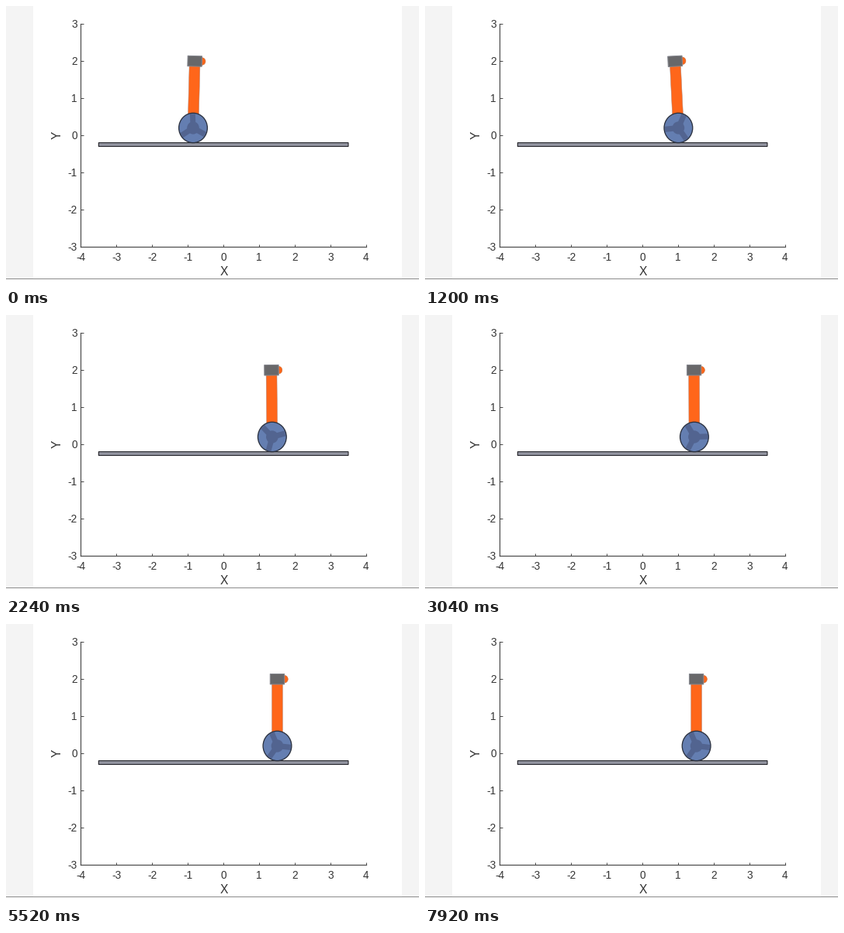
A matplotlib script that plays this animation: 532x363 px, repeating every 8000 ms.

```python
import numpy as np
import matplotlib.pyplot as plt
from matplotlib.animation import FuncAnimation
from matplotlib.patches import Circle, Polygon, Rectangle

W, H, DPI = 532, 363, 100
STEP, FRAMES = 80, 100
PX = 72 / DPI
INK, AXIS = "#333333", "#4a4a4a"
ORANGE, GREY = "#ff661a", "#68686a"
BLUE, DARK_BLUE = "#647eb1", "#526490"
R, ARM, GOAL = 0.4, 1.8, 1.512

# Frames in which the picture stands still
HOLDS = {11, 12, 16, 18, 19, 20, 25, 35, 40, 44, 49}

# Modes of the balancing controller: the gap to the goal is Re(sum c*exp(s*t))
COEF = np.array([2.05, 0.314 - 0.40j])
RATE = np.array([-1.17, -2.5 + 2j])

plt.rcParams["font.family"] = "Liberation Sans"
fig = plt.figure(figsize=(W / DPI, H / DPI), dpi=DPI, facecolor="white")

# Page behind the plot, in pixels from the top left
page = fig.add_axes([0, 0, 1, 1])
page.set(xlim=(0, W), ylim=(H, 0))
page.axis("off")
for x, w in ((0, 35), (510, 22)):
    page.add_patch(Rectangle((x, 0), w, 352, color="#f4f4f4", lw=0))
page.add_patch(Rectangle((0, 352), W, 1, color="#8c8c8c", lw=0))

LEFT, RIGHT, TOP, BOTTOM = 96.4, 463.9, 23.3, 310.8
ax = fig.add_axes([LEFT / W, 1 - BOTTOM / H, (RIGHT - LEFT) / W, (BOTTOM - TOP) / H])
ax.set(xlim=(-4, 4), ylim=(-3, 3), xticks=range(-4, 5), yticks=range(-3, 4))
ax.patch.set_visible(False)
ax.spines[["top", "right"]].set_visible(False)
for side in ("left", "bottom"):
    ax.spines[side].set(color=AXIS, linewidth=1.2 * PX)
ax.tick_params(direction="in", length=3.5 * PX, width=PX, color=AXIS,
               labelleft=False, labelbottom=False)


def label(x, y, s, size=13.6, **kw):
    page.text(x, y, s, fontsize=size * PX, color=INK, **kw)


for v in range(-4, 5):
    label(LEFT + (v + 4) * (RIGHT - LEFT) / 8, 328.6, str(v), ha="center")
for v in range(-3, 4):
    label(91.7, BOTTOM - (v + 3) * (BOTTOM - TOP) / 6 + 4.9, str(v), ha="right")
label(280.4, 347.6, "X", 15.6, ha="center")
label(66.2, 166.6, "Y", 15.6, ha="center", va="center", rotation=90)


def box(x0, x1, y0, y1):
    return np.array([(x0, y0), (x1, y0), (x1, y1), (x0, y1)])


def turn(pts, angle):
    c, s = np.cos(angle), np.sin(angle)
    return np.asarray(pts) @ np.array([[c, s], [-s, c]])


def add(patch, z):
    patch.set_zorder(z)
    return ax.add_patch(patch)


BODY = box(-0.15, 0.15, 0, ARM)
HEAD = box(-0.2, 0.2, ARM - 0.14, ARM + 0.14)
NOSE = np.array([0.2, ARM])
SPOKE = box(0, R - 0.02, -0.075, 0.075)

add(Rectangle((-3.5, -0.3), 7, 0.1, fc="#9496a2", ec="#2c2c32", lw=1.2 * PX,
              snap=False), 2)
body = add(Polygon(BODY, fc=ORANGE, ec="#b08070", lw=0.5 * PX), 3)
nose = add(Circle((0, 0), 0.1, fc=ORANGE, ec="#c0642c", lw=0.5 * PX), 3)
head = add(Polygon(HEAD, fc=GREY, ec="#85878f", lw=PX), 4)
wheel = add(Circle((0, 0), R, fc=BLUE, lw=0), 5)
spokes = [add(Polygon(SPOKE, fc=DARK_BLUE, lw=0), 6) for _ in range(3)]
hub = add(Circle((0, 0), 0.17, fc=DARK_BLUE, lw=0), 6)
rim = add(Circle((0, 0), R, fill=False, ec="#2a303e", lw=1.3 * PX), 7)
for part in (body, head, *spokes):
    part.set_snap(False)


def state(t):
    modes = COEF * np.exp(RATE * t)
    gap = modes.sum().real
    accel = -(modes * RATE**2).sum().real
    return GOAL - gap, 0.054 * accel


def draw(i):
    while i in HOLDS:
        i -= 1
    x, lean = state(i * STEP / 1000)
    axle = np.array([x, 0.2])
    body.set_xy(turn(BODY, -lean) + axle)
    head.set_xy(turn(HEAD, -lean) + axle)
    nose.center = turn(NOSE, -lean) + axle
    for part in (wheel, hub, rim):
        part.center = axle
    for k, spoke in enumerate(spokes):
        spoke.set_xy(turn(SPOKE, np.pi / 2 - x / R + k * 2 * np.pi / 3) + axle)
    return [body, head, nose, wheel, hub, rim, *spokes]


anim = FuncAnimation(fig, draw, frames=FRAMES, interval=STEP, repeat=True,
                     repeat_delay=0, init_func=lambda: draw(0))
plt.show()
```
